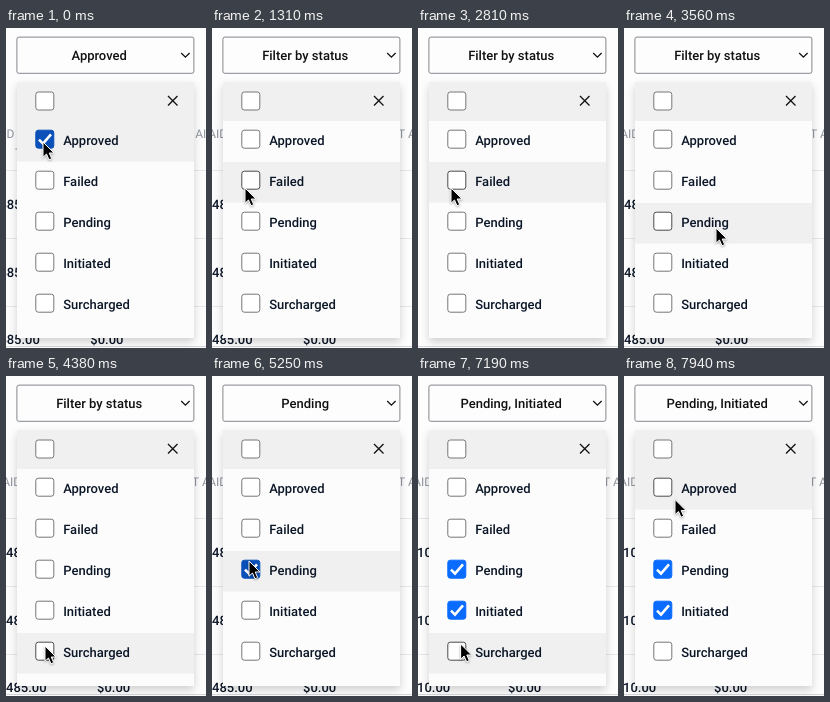
Animation, 200 px wide and 320 px high, one loop 8 s. Source, as an HTML page:

```html
<!DOCTYPE html>
<html lang="en">
<head>
<meta charset="utf-8">
<title>Status filter</title>
<style>
  html, body { margin: 0; width: 100%; height: 100%; overflow: hidden; background: #fdfdfe; }
  svg {
    display: block; width: 200px; height: 320px; fill: #0b1626;
    font: 500 13px Roboto, sans-serif; text-rendering: geometricPrecision;
  }
  .panel { fill: #fcfcfd; filter: drop-shadow(0 4px 4px rgba(0, 0, 0, .18)); }
  .shade { fill: #f0f0f1; }
  .line { stroke: #e6e8eb; }
  .head { font-size: 12px; font-weight: 400; fill: #8f959e; }
  .value { text-anchor: middle; fill: #111; }
  .icon { fill: none; stroke: #111; stroke-width: 1.3; }
  .box rect { fill: #fff; stroke: #767676; }
  .box path { fill: none; stroke: #fff; stroke-width: 2.6; visibility: hidden; }
  .box.hover rect { stroke: #4a4a4a; }
  .box.on rect { fill: #0a6cff; stroke: #0a6cff; }
  .box.on.hover rect { fill: #0a50b8; stroke: #0a50b8; }
  .box.on path { visibility: visible; }
  #cursor { stroke: #fff; stroke-linejoin: round; filter: drop-shadow(0 1px 1px rgba(0, 0, 0, .3)); }
</style>
</head>
<body>
<svg viewBox="0 0 200 320">
  <g id="table">
    <text class="head" x="-10.6" y="110">PAID</text>
    <text class="head" x="186" y="110">T AID</text>
    <path d="M16 121h3" stroke="#8f959e"/>
    <path class="line" d="M-10 142.5H220M-10 210.5H220M-10 278.5H220"/>
    <g id="sums"></g>
  </g>
  <path d="M0 318.5H200" stroke="#d3d6da"/>

  <rect x="10.9" y="9.1" width="177" height="36.2" rx="2" fill="#fdfdfe" stroke="#83868b"/>
  <text id="value" class="value" x="93.2" y="31.7"></text>
  <path class="icon" d="M175.2 25l4.2 4.2 4.2-4.2"/>

  <rect class="panel" x="11" y="54" width="177" height="256"/>
  <rect class="shade" x="11" y="54" width="177" height="39"/>
  <rect class="shade" id="hover" x="11" width="177" height="40.5"/>
  <path class="icon" d="M162 68l9.5 9.5M171.5 68l-9.5 9.5"/>
  <g id="rows"></g>
  <path id="cursor" fill="#000" d="M0 0V15.2L3.5 12 6 17.8 8.7 16.6 6.2 11H11Z"/>
</svg>
<script>
  const LOOP = 8000, STEP = 62.5, TOP = 93, PITCH = 41, LAG = 125;
  const $ = id => document.getElementById(id);

  const names = ['Approved', 'Failed', 'Pending', 'Initiated', 'Surcharged'];

  // selections that have rows: amount and sideways scroll of the table
  const results = {
    'Filter by status': ['485.00', 0],
    'Approved': ['485.00', -6.7],
    'Pending, Initiated': ['10.00', -1]
  };

  // time and row of each toggle; the loop opens with Approved checked
  const clicks = [[0, 0], [687, 0], [1687, 1], [2812, 1], [5187, 2], [6437, 3]];

  // pointer moves: start, end, target x and y, sideways bend
  const moves = [
    [0, 125, 53, 175, 0],
    [375, 562, 37, 114, 0],
    [750, 1125, 38, 264, 20],
    [1187, 1312, 33, 160, 0],
    [3312, 3562, 92, 200, 0],
    [3562, 3812, 89, 179, -40],
    [4000, 4375, 39, 270, 60],
    [4562, 5000, 37, 185, 110],
    [5937, 6250, 36, 231, 110],
    [6687, 7187, 42.6, 268, 20],
    [7187, 7937, 51, 123.5, 110]
  ];

  const box = cy => `<g class="box" transform="translate(29.8 ${cy - 9})">
    <rect width="18" height="18" rx="2.5"/><path d="M3.2 9.4l4 4 8-9.2"/></g>`;

  $('rows').innerHTML = box(73) + names.map((name, i) =>
    box(111.2 + PITCH * i) + `<text x="57.2" y="${117.2 + PITCH * i}">${name}</text>`).join('');
  $('sums').innerHTML = [0, 1, 2].map(i => 181 + 67.5 * i).map(y =>
    `<text class="sum" y="${y}"></text><text x="91" y="${y}">$0.00</text>`).join('');

  const boxes = [...document.querySelectorAll('.box')].slice(1);
  const sums = document.querySelectorAll('.sum');

  function tipAt(t) {
    let x = 37, y = 114;
    for (const [from, to, x1, y1, bend] of moves) {
      if (t < from) break;
      const u = Math.min(1, (t - from) / (to - from));
      const k = u * u * (3 - 2 * u);
      x += (x1 - x) * k + 2 * bend * k * (1 - k);
      y += (y1 - y) * k;
    }
    return [x, y];
  }

  const isOn = (row, t) => clicks.filter(c => c[1] === row && c[0] <= t).length % 2 === 1;
  const labelAt = t => names.filter((n, i) => isOn(i, t)).join(', ') || 'Filter by status';

  function draw(t) {
    const [x, y] = tipAt(t);
    const row = Math.floor((y - TOP) / PITCH);
    $('cursor').setAttribute('transform', `translate(${x} ${y})`);
    $('hover').setAttribute('y', TOP + PITCH * row);
    $('value').textContent = labelAt(t);
    boxes.forEach((b, i) => {
      b.classList.toggle('on', isOn(i, t));
      b.classList.toggle('hover', i === row);
    });

    // the table answers a little after the click
    const [sum, shift] = results[labelAt(Math.max(0, t - LAG))] || ['', 0];
    $('table').setAttribute('transform', `translate(${shift} 0)`);
    $('table').style.display = sum ? '' : 'none';
    sums.forEach(s => s.textContent = sum);
  }

  function tick() {
    const t = (performance.now() + 5) % LOOP;
    draw(Math.floor(t / STEP) * STEP);
    requestAnimationFrame(tick);
  }
  tick();
</script>
</body>
</html>
```
